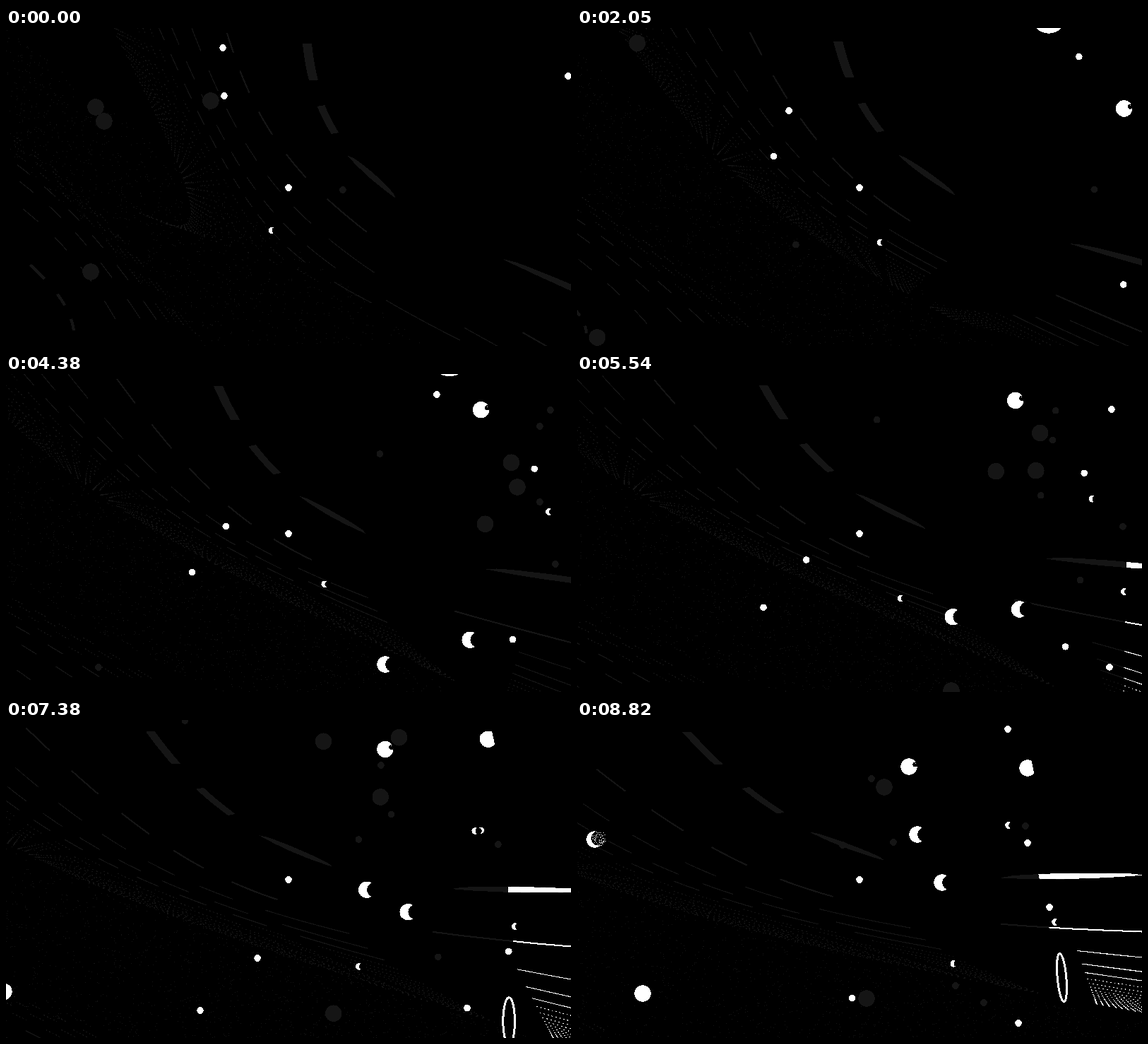
These frames come from a looping animation (800 by 450 pixels, 8920 ms). An HTML page with a canvas:

```html
<!DOCTYPE html>
<html lang="en">
<head>
<meta charset="utf-8">
<title>Orbits</title>
<style>
html, body { margin: 0; width: 100%; height: 100%; overflow: hidden; background: #000; }
canvas { display: block; width: 800px; height: 450px; }
</style>
</head>
<body>
<canvas id="stage" width="800" height="450"></canvas>
<script>
const ctx = document.getElementById('stage').getContext('2d', { willReadFrequently: true });
const LOOP = 8920, LAST = 8.82, MID = 4.38;
const DIM = '#151515', WHITE = '#fff', BLACK = '#000';

// Each ring is a conic: start x,y, control x,y, end x,y, weight,
// posed at the start, middle and end of the loop.
const ring1 = [
  420,22, 441,222, 900,415, 1.6,
  294,17, 396,252, 845,301, 1.2,
  149,17, 354,243, 750,223, 1.2];
const ring2 = [
  313,7, 385,245, 900,525, 2,
  157,7, 348,265, 800,380, 2,
  -40,14, 272,279, 755,298, 1.4];
const ring3 = [
  263,0, 366,269, 690,447, 1.7,
  88,0, 287,249, 800,418, 2,
  -125,15, 180,274, 780,334, 1.6];
const low2 = [
  24,256, 110,325, 176,450, 1.2,
  -130,330, -20,390, 60,452, 1.2,
  -280,400, -150,450, -60,500, 1.2];
const low3 = [
  19,217, 115,290, 215,450, 1.2,
  -130,300, 0,365, 125,450, 1.2,
  -280,370, -120,420, 0,490, 1.2];

// Balls travel on arcs between two places: radius, from x,y, to x,y, options.
const S = 4.8, M = 11.7, L = 23.5;
const smallBite = { bite: { dx: 4.8, r: 4.6 } };
const bigBite = { bite: { dx: 10.6, r: 10.4 } };
const dimGroups = [
  { from: 0, to: MID, balls: [
    [S, 477,229, 131,415],
    [M, 127,112, -175,307],
    [M, 139,132, -215,205, { grow: 0.6 }],
    [M, 290,103, -156,-45],
    [M, 120,345, -63,554],
    [M, 965,345, 735,475]] },
  { from: 3.01, to: LAST, balls: [
    [S, 650,178, 115,-38],
    [M, 783,179, 475,-15],
    [M, 774,307, 330,-45]] },
  { from: MID, to: LAST, balls: [
    [M, 724,160, 435,95],
    [S, 771,51, 417,83],
    [S, 756,74, 448,173],
    [S, 756,181, 376,177],
    [S, 778,269, 536,376]] },
  { from: 5.54, to: LAST, balls: [
    [S, 773,216, 635,150],
    [S, 700,530, 576,400],
    [M, 530,448, 410,394]] }
];
const whiteGroups = [
  { from: 0, to: 7.38, balls: [
    [S, 400,226, 400,226],
    [S, 307,28, 356,337],
    [S, 309,96, 275,411]] },
  { from: 0, to: MID, balls: [
    [S, 796,68, 610,29, { until: 5 }],
    [L, 690,-45, 628,-20, { bend: -0.52 }],
    [L, 930,-30, 745,-30, { bend: -0.2 }]] },
  { from: 3.01, to: LAST, balls: [
    [S, 785,131, 638,174],
    [S, 750,367, 625,429],
    [M, 733,82, 470,66, { bend: 0.2, bite: { dx: 9, dy: -3, r: 3.6, specks: 3 } }],
    [M, 688,432, 517,230, bigBite]] },
  { from: MID, to: LAST, balls: [
    [M, 537,411, 482,162, bigBite],
    [S, 769,195, 611,149, smallBite]] },
  { from: 5.54, to: LAST, balls: [
    [S, 757,50, 610,13],
    [S, 754,415, 669,265],
    [S, 775,308, 677,286, smallBite],
    [M, 747,-16, 638,68, { cut: true }],
    [M, -124,363, 93,387],
    [M, -180,130, 25,169, { bite: { dx: 5.5, dy: -1.5, r: 10.5, specks: 70 } }]] }
];

function random(seed) {
  return () => {
    seed = (seed * 1664525 + 1013904223) >>> 0;
    return seed / 4294967296;
  };
}
const rnd = random(11);
const dust = Array.from({ length: 2000 }, () => [rnd(), rnd()]);

// Parabola in time through the three poses.
function poser(t) {
  const w = [
    (t - MID) * (t - LAST) / (MID * LAST),
    t * (t - LAST) / (MID * (MID - LAST)),
    t * (t - MID) / (LAST * (LAST - MID))
  ];
  return a => {
    const n = a.length / 3;
    return Array.from({ length: n }, (_, i) => a[i] * w[0] + a[i + n] * w[1] + a[i + 2 * n] * w[2]);
  };
}

// Two points joined by an arc whose heading turns at the rate bend.
function arc(from, to, x0, y0, x1, y1, bend, t) {
  const u = (t - from) / (to - from), dx = x1 - x0, dy = y1 - y0;
  const bow = bend * (to - from) / 2 * u * (1 - u);
  return [x0 + dx * u - dy * bow, y0 + dy * u + dx * bow];
}

function conicPoint([x0, y0, x1, y1, x2, y2, w], u) {
  const a = (1 - u) ** 2, b = 2 * w * u * (1 - u), c = u * u, sum = a + b + c;
  return [(a * x0 + b * x1 + c * x2) / sum, (a * y0 + b * y1 + c * y2) / sum];
}

function sample(conic, u0, u1, steps = 6) {
  return Array.from({ length: steps + 1 }, (_, i) => conicPoint(conic, u0 + (u1 - u0) * i / steps));
}

function stroke(points, width) {
  ctx.lineWidth = width;
  ctx.beginPath();
  for (const p of points) ctx.lineTo(...p);
  ctx.stroke();
}

function polygon(points) {
  ctx.beginPath();
  for (const p of points) ctx.lineTo(...p);
  ctx.fill();
}

function disc(x, y, r, color) {
  ctx.fillStyle = color;
  ctx.beginPath();
  ctx.arc(x, y, r, 0, Math.PI * 2);
  ctx.fill();
}

// Perspective distance of ring k past the third, in steps from second to third.
const depth = k => (1 / 3.95 - 1 / (k + 0.95)) / (1 / 2.95 - 1 / 3.95);
const beyond = (near, far, k) =>
  far.map((v, i) => i === 6 ? v : v + (v - near[i]) * depth(k));

// Ring k has 2k + 3 dashes, one of them missing; the last ones are long.
function dashes(k, draw) {
  const [a, b] = k === 1 ? [0.66, 0.16] : k === 2 ? [0.36, 0.52] : [0.54, 0.42];
  const place = n => {
    const s = n / (2 * k + 2);
    return a * s + b * s * s;
  };
  for (let n = 0; n <= 2 * k + 2; n++) {
    if (n === 2 * k + 1) continue;
    const length = n < 2 * k ? 0.54 : k === 2 && n === 4 ? 0.65 : 0.92;
    draw(place(n), place(n + length), n);
  }
}

function drawBand(conic, u0, u1, n) {
  const edge = sample(conic, u0, u1, 12);
  const top = edge.map(([x, y], i) => {
    const full = n < 2 ? 1 : Math.sin(Math.PI * i / 12) ** 0.6;
    return [x + (13 - 2.5 * n) * full, y - 2 * n * full];
  });
  polygon([...edge, ...top.reverse()]);
}

function drawRings(pose, color) {
  ctx.fillStyle = ctx.strokeStyle = color;
  const first = pose(ring1), near = pose(ring2), far = pose(ring3);
  dashes(1, (u0, u1, n) => drawBand(first, u0, u1, n));
  for (let k = 2; k < 22; k++) {
    const conic = beyond(near, far, k);
    if (k > 5) ctx.setLineDash([2, 2 + k / 4]);
    dashes(k, (u0, u1) => stroke(sample(conic, u0, u1), k === 2 ? 2 : 1.1));
  }
  ctx.setLineDash([]);
}

function drawLowerLeft(pose) {
  ctx.strokeStyle = DIM;
  const near = pose(low2), far = pose(low3);
  for (let k = 1; k < 9; k++) {
    const conic = beyond(near, far, k), rows = k + 2;
    if (k > 4) ctx.setLineDash([2, 3]);
    for (let n = 0; n < rows; n++)
      stroke(sample(conic, n / rows, (n + 0.45) / rows), k === 1 ? 4 : 1.2);
  }
  ctx.setLineDash([]);
}

function drawDust(t, pose) {
  const [a, b, c] = pose([0,230,450, 80,262,430, 185,300,385]);
  const [base, tilt] = pose([170,1, 300,0.5, 460,0.15]);
  ctx.fillStyle = DIM;
  for (const [u, v] of dust) {
    const x = ((u * 840 - t * 22) % 840 + 840) % 840, s = x / 300;
    const top = a * (s - 1) * (s - 2) / 2 - b * s * (s - 2) + c * s * (s - 1) / 2;
    const y = top + v * (base + tilt * x - top);
    if (y < 450) ctx.fillRect(Math.round(x), Math.round(y), 1, 1);
  }
}

// Everything right of a drifting edge is lit.
function drawLight(t, pose) {
  const late = t - 7.38, tilt = 0.1 + 0.07 * late;
  const xAt = y => 711 - 37 * late + (y - 240) * tilt;
  ctx.save();
  ctx.beginPath();
  ctx.moveTo(xAt(0), 0);
  ctx.lineTo(900, 0);
  ctx.lineTo(900, 450);
  ctx.lineTo(xAt(450), 450);
  ctx.clip();
  drawRings(pose, WHITE);
  ctx.restore();
}

function drawBite(x, y, { dx, dy = 0, r, specks = 0 }) {
  const bx = x + dx, by = y + dy, speck = random(5);
  disc(bx, by, r, BLACK);
  ctx.fillStyle = WHITE;
  for (let i = 0; i < specks; i++) {
    const a = speck() * Math.PI * 2, d = Math.sqrt(speck()) * r;
    ctx.fillRect(Math.round(bx + Math.cos(a) * d), Math.round(by + Math.sin(a) * d), 1, 1);
  }
}

function drawGroups(groups, t, color, turn) {
  for (const { from, to, balls } of groups) {
    for (const [r, x0, y0, x1, y1, opt = {}] of balls) {
      if (t > opt.until) continue;
      const [x, y] = arc(from, to, x0, y0, x1, y1, opt.bend ?? turn, t);
      disc(x, y, t > opt.grow ? L : r, color);
      if (opt.cut) {
        ctx.fillStyle = BLACK;
        polygon([[x + 5, y - 13], [x + 14, y - 13], [x + 14, y + 13], [x + 10.5, y + 13]]);
      }
      if (opt.bite) drawBite(x, y, opt.bite);
    }
  }
}

function drawMoon(t) {
  const a = Math.PI * 2 * (t - 1.1) / 6.2;
  const x = 388 + 15 * t + 13 * Math.sin(a), y = 280 + 7.3 * t + 15 * Math.cos(a);
  disc(x, y, S, WHITE);
  drawBite(x, y, smallBite.bite);
}

function drawHoop(t) {
  const [x, y] = arc(5.54, LAST, 733, 509, 686.5, 364.5, 0.09, t);
  const u = (t - 7.38) / 1.44;
  ctx.strokeStyle = WHITE;
  ctx.lineWidth = 3;
  ctx.beginPath();
  ctx.ellipse(x, y, 8.3 - 2 * u, 33.5 + u, -0.09 * u, 0, Math.PI * 2);
  ctx.stroke();
}

// Hard pixels: only black, dim and white.
function crisp() {
  const image = ctx.getImageData(0, 0, 800, 450), d = image.data;
  for (let i = 0; i < d.length; i += 4) {
    const v = d[i];
    if (v) d[i] = d[i + 1] = d[i + 2] = v > 127 ? 255 : v > 9 && v < 60 ? 21 : 0;
  }
  ctx.putImageData(image, 0, 0);
}

function draw(t) {
  const pose = poser(t);
  ctx.fillStyle = BLACK;
  ctx.fillRect(0, 0, 800, 450);
  drawDust(t, pose);
  drawLowerLeft(pose);
  drawRings(pose, DIM);
  if (t > 4.8) drawLight(t, pose);
  drawGroups(dimGroups, t, DIM, 0.05);
  if (t > 6) drawHoop(t);
  drawGroups(whiteGroups, t, WHITE, 0.09);
  drawMoon(t);
  crisp();
}

const begin = performance.now();
function tick() {
  draw(Math.min(((performance.now() - begin) % LOOP) / 1000, LAST));
  requestAnimationFrame(tick);
}
tick();
</script>
</body>
</html>
```
